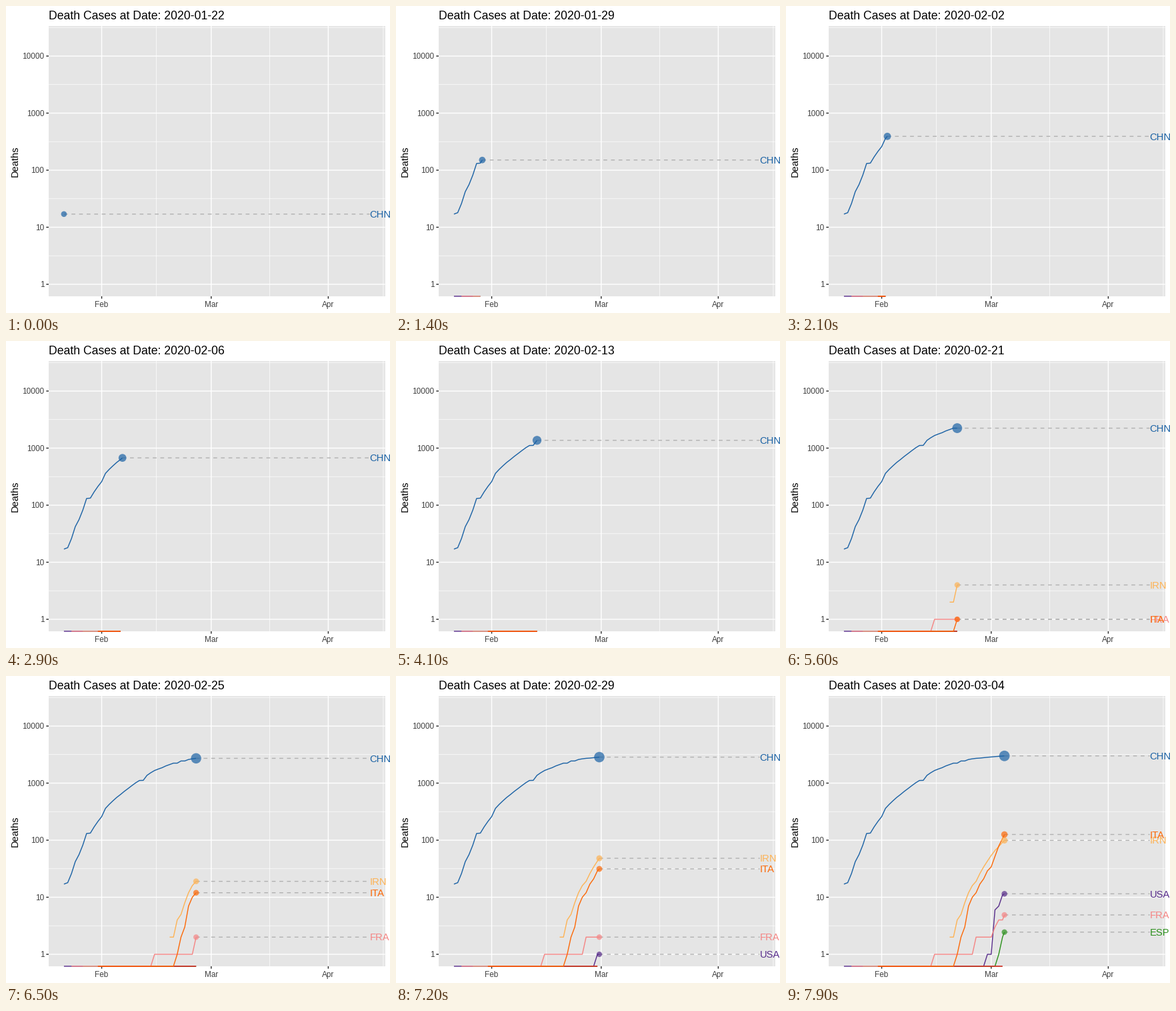
A matplotlib script that plays this animation: 576 by 460 pixels, repeating every 8000 ms.

```python
import numpy as np
import matplotlib.pyplot as plt
from matplotlib.animation import FuncAnimation
from matplotlib.patches import Circle, Rectangle

W, H, DPI = 576, 460, 96
PX = 72 / DPI                     # points per pixel
FRAMES, INTERVAL = 80, 100
STEP = 80 / 149                   # days per frame
LEFT, RIGHT, TOP, BOTTOM = 64, 568.7, 30, 434.9
THICK, THIN = 1.42, 0.71
START = np.datetime64("2020-01-22")
LAST_DAY = 43

plt.rcParams["font.family"] = "Liberation Sans"

# code: (colour, first day, leading zeros, death counts)
COUNTRIES = {
    "USA": ("#582D8B", 0, 38, [1, 1, 6, 7, 11, 12]),
    "ESP": ("#2C911D", 10, 31, [1, 2, 3]),
    "DEU": ("#A6D976", 5, 39, []),
    "CHN": ("#1B62A5", 0, 0,
            [17, 18, 26, 42, 56, 82, 131, 133, 171, 213, 259, 361, 425, 491,
             563, 633, 718, 805, 905, 1012, 1112, 1117, 1369, 1521, 1663,
             1766, 1864, 2003, 2116, 2238, 2238, 2443, 2445, 2595, 2665,
             2717, 2746, 2790, 2837, 2872, 2914, 2947, 2983, 3015]),
    "FRA": ("#F58584", 2, 22, [1] * 11 + [2] * 5 + [3, 4, 4, 6]),
    "IRN": ("#FDB356", 28, 0,
            [2, 2, 4, 5, 8, 12, 16, 19, 26, 34, 43, 54, 66, 77, 92, 107]),
    "GBR": ("#DC0A17", 9, 35, []),
    "ITA": ("#FC6908", 9, 21,
            [1, 2, 3, 7, 10, 12, 17, 21, 29, 34, 52, 79, 107, 148]),
}


def x_pos(day):
    return 86.9 + 5.664 * day


def y_pos(log_deaths):
    return 417 - 85.5 * log_deaths


def radius(deaths):
    return 4 + 0.0715 * np.sqrt(deaths)


fig = plt.figure(figsize=(W / DPI, H / DPI), dpi=DPI, facecolor="white")
ax = fig.add_axes([0, 0, 1, 1])
ax.set_xlim(0, W)
ax.set_ylim(H, 0)
ax.axis("off")


def stroke(xs, ys, color, width=THICK, z=1, **kw):
    line, = ax.plot(xs, ys, color=color, lw=width * PX, zorder=z,
                    solid_capstyle="butt", snap=False, **kw)
    return line


def label(x, y, text, size, color, ha="left", **kw):
    return ax.text(x, y, text, fontsize=size, color=color, ha=ha,
                   va="baseline", **kw)


def draw_axes():
    ax.add_patch(Rectangle((LEFT, TOP), RIGHT - LEFT, BOTTOM - TOP,
                           fc="#E5E5E5", ec="none", zorder=0))
    for x in (225.6, 395.6, 565.9):
        stroke([x, x], [TOP, BOTTOM], "white", THIN)
    for k in range(5):
        y = y_pos(k + 0.5)
        stroke([LEFT, RIGHT], [y, y], "white", THIN)
    for k in range(5):
        y = y_pos(k)
        stroke([LEFT, RIGHT], [y, y], "white")
        stroke([LEFT - 3.67, LEFT], [y, y], "#2B2B2B")
        label(57.2, y + 4.2, str(10 ** k), 8.8, "#404040", "right")
    for day, month in ((10, "Feb"), (39, "Mar"), (70, "Apr")):
        x = x_pos(day)
        stroke([x, x], [TOP, BOTTOM], "white")
        stroke([x, x], [BOTTOM, BOTTOM + 3.67], "#2B2B2B")
        label(x, 451, month, 8.8, "#404040", "center")
    label(18, 232.5, "Deaths", 11, "black", "center",
          rotation=90, rotation_mode="anchor")


class Country:
    def __init__(self, code, color, first, zeros, counts, z):
        self.first = first
        self.deaths = np.array([0] * zeros + counts, float)
        days = first + np.arange(len(self.deaths))
        self.xs = x_pos(days)
        self.logs = np.log10(np.maximum(self.deaths, 1))
        # zero has no logarithm and sits on the panel's lower edge
        self.ys = np.where(self.deaths > 0, y_pos(self.logs), BOTTOM)
        self.line = stroke([], [], color, z=2 + z / 100)
        self.guide = stroke([], [], "#B2B2B2", z=3, linestyle=(0, (4, 4)))
        self.dot = Circle((0, 0), 4, fc=color, ec="none", alpha=0.7,
                          zorder=4 + z / 100)
        ax.add_patch(self.dot)
        self.tag = label(x_pos(81), 0, code, 11.04, color, zorder=5 + z / 100)

    def update(self, day):
        whole = int(day)
        part = day - whole
        i = whole - self.first
        n = max(i + 1, 0)
        xs, ys = list(self.xs[:n]), list(self.ys[:n])
        shown = bool(i >= 0 and self.deaths[i] > 0)
        if shown:
            log = self.logs[i]
            if part > 0:
                log += part * (self.logs[i + 1] - log)
            x, y = x_pos(day), y_pos(log)
            xs.append(x)
            ys.append(y)
            self.dot.center = x, y
            self.dot.radius = radius(10 ** log)
            self.guide.set_data([x, x_pos(81)], [y, y])
            self.tag.set_y(y + 5.2)
        self.line.set_data(xs, ys)
        for artist in (self.dot, self.guide, self.tag):
            artist.set_visible(shown)


draw_axes()
title = label(LEFT - 0.3, 20, "", 13.2, "black")
countries = [Country(code, *spec, z)
             for z, (code, spec) in enumerate(COUNTRIES.items())]

# each day's data falls on a whole frame
day_numbers = np.arange(LAST_DAY + 1)
day_frames = np.round(day_numbers / STEP)


def draw(frame):
    day = float(np.interp(frame, day_frames, day_numbers))
    title.set_text(f"Death Cases at Date: {START + int(frame * STEP)}")
    for country in countries:
        country.update(day)
    return []


anim = FuncAnimation(fig, draw, frames=FRAMES, interval=INTERVAL,
                     repeat=True, repeat_delay=0, blit=False)
plt.show()
```
